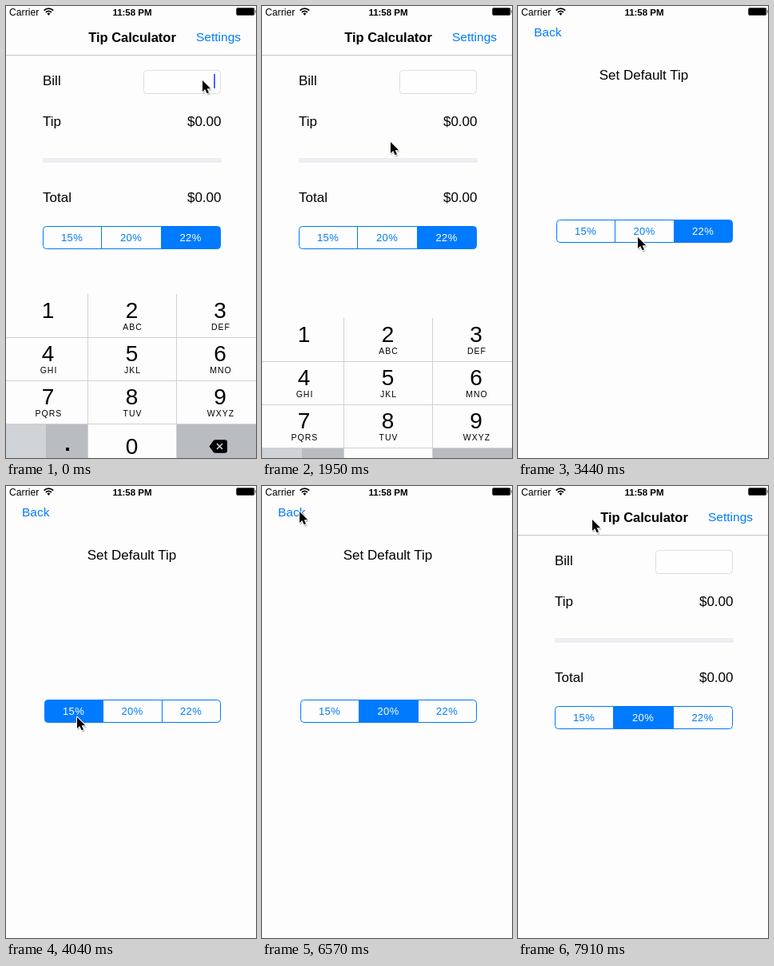
Write an HTML page that moves like this. It is 313x565 px and loops after 8000 ms.

```html
<!DOCTYPE html>
<html lang="en">
<head>
<meta charset="utf-8">
<title>Tip Calculator</title>
<style>
  html, body { margin: 0; width: 100%; height: 100%; overflow: hidden; background: #fdfdfd; }
  svg { display: block; width: 313px; height: 565px; font: 17px "Liberation Sans", Arial, sans-serif; }
  .blue { fill: #007aff; font-size: 15.5px; }
  .mid { text-anchor: middle; }
  .end { text-anchor: end; }
  .title { font-size: 16.5px; font-weight: bold; }
  .percent { font-size: 13px; letter-spacing: .4px; }
  .digit { font-size: 28px; }
  .letters { font-size: 10.5px; letter-spacing: 1px; }
  .paper { fill: #fdfdfd; }
</style>
</head>
<body>
<svg viewBox="0 0 313 565">
  <g>
    <rect class="paper" width="313" height="565"/>
    <text class="title mid" x="158" y="45">Tip Calculator</text>
    <text id="settings" class="blue" x="238" y="44">Settings</text>
    <path d="M0 61.5H313" stroke="#c4c4c6"/>
    <text x="46" y="99">Bill</text>
    <rect x="172.5" y="80.5" width="96" height="29" rx="4" fill="#fefefe" stroke="#dedee0"/>
    <rect id="caret" x="260" y="85" width="2" height="18" fill="#426bf2"/>
    <text x="46" y="150">Tip</text>
    <text class="end" x="269.5" y="150">$0.00</text>
    <rect x="46" y="190" width="224" height="6" fill="#eeedf3"/>
    <text x="46" y="245">Total</text>
    <text class="end" x="269.5" y="245">$0.00</text>
    <g id="mainTips" transform="translate(46.5 275.5)"></g>
  </g>
  <g id="keyboard"></g>
  <g id="sheet">
    <rect class="paper" width="313" height="565"/>
    <text class="blue" x="20" y="38">Back</text>
    <text class="mid" x="157.5" y="92">Set Default Tip</text>
    <g id="sheetTips" transform="translate(48.5 267.5)"></g>
  </g>
  <g>
    <text x="4" y="11.5" font-size="12.2">Carrier</text>
    <g fill="none" stroke="#000" stroke-width="1.7">
      <path d="M47.6 5.6a8.2 8.2 0 0 1 11.6 0M49.8 8a5 5 0 0 1 7.2 0"/>
      <path d="M53.4 11.8l-2-2.2a2.8 2.8 0 0 1 4 0z" fill="#000" stroke="none"/>
    </g>
    <text class="mid" x="158" y="11.5" font-size="11.5" font-weight="bold">11:58 PM</text>
    <rect x="288.5" y="2.5" width="22.5" height="9" rx="1.5" fill="none" stroke="#000" stroke-width=".7"/>
    <rect x="289" y="3" width="21.5" height="8" rx=".8"/>
    <path d="M312 5.3q1.2 1.7 0 3.4z"/>
  </g>
  <g id="pointer">
    <path d="M1 2V16l3.2-3 2.4 5.2 2.4-1-2.4-5h4.6z" opacity=".25" stroke="#000"/>
    <path d="M0 0V14l3.2-3 2.4 5.2 2.4-1-2.4-5h4.6z" stroke="#fff" stroke-width="2" stroke-linejoin="round" paint-order="stroke"/>
  </g>
</svg>
<script>
  const LOOP = 8000, HEIGHT = 565, KEYS_HEIGHT = 216;
  const $ = id => document.getElementById(id);
  const clamp = v => Math.min(1, Math.max(0, v));

  // Three-cell segmented control; returns a function that selects one cell.
  function segmented(group, width) {
    const blue = '#007aff', edges = [0, .33, .667, 1].map(part => Math.round(width * part));
    const cellPaths = [
      `M${edges[1]} 0H4Q0 0 0 4V24Q0 28 4 28H${edges[1]}z`,
      `M${edges[1]} 0H${edges[2]}V28H${edges[1]}z`,
      `M${edges[2]} 0H${width - 4}Q${width} 0 ${width} 4V24Q${width} 28 ${width - 4} 28H${edges[2]}z`
    ];
    group.innerHTML = ['15%', '20%', '22%'].map((label, i) =>
      `<path d="${cellPaths[i]}" stroke="${blue}"/>
       <text class="percent mid" x="${(edges[i] + edges[i + 1]) / 2 - .5}" y="18.5">${label}</text>`).join('');
    const shapes = group.querySelectorAll('path'), labels = group.querySelectorAll('text');
    return selected => shapes.forEach((shape, i) => {
      shape.setAttribute('fill', i === selected ? blue : '#fdfdfd');
      labels[i].setAttribute('fill', i === selected ? '#fff' : blue);
    });
  }

  function buildKeyboard() {
    const letters = ['', 'ABC', 'DEF', 'GHI', 'JKL', 'MNO', 'PQRS', 'TUV', 'WXYZ'];
    const centers = [52.5, 157.5, 268];
    const keys = letters.map((word, i) => {
      const x = centers[i % 3], y = Math.floor(i / 3) * 54;
      return `<text class="digit mid" x="${x}" y="${y + 30}">${i + 1}</text>
              <text class="letters mid" x="${x + 1}" y="${y + 45}">${word}</text>`;
    }).join('');
    $('keyboard').innerHTML = `
      <rect class="paper" width="313" height="216"/>
      <rect y="162" width="50" height="54" fill="#cfd3d7"/>
      <rect x="50" y="162" width="53" height="54" fill="#b9bcc1"/>
      <rect x="213" y="162" width="100" height="54" fill="#b9bcc1"/>
      <path d="M102.5 0V216M213.5 0V216M0 54.5H313M0 108.5H313M0 162.5H313" stroke="#d0d1d3" fill="none"/>
      ${keys}
      <text class="digit mid" x="157.5" y="199.5">0</text>
      <rect x="75" y="192" width="4" height="4"/>
      <path d="M254.5 190.5l5-7q1-1.3 3-1.3h11.5q3 0 3 3v10.6q0 3-3 3h-11.5q-2 0-3-1.3z"/>
      <path d="M264 187l7 7m0-7l-7 7" stroke="#d5d7da" stroke-width="1.5"/>`;
  }

  // The screen refreshes every 150 ms, with a few 140 ms steps.
  const shortSteps = [3000, 4040, 4480, 7770];
  function snap(time) {
    let start = 0;
    for (;;) {
      const next = start + (shortSteps.includes(start) ? 140 : 150);
      if (next > time) return start;
      start = next;
    }
  }

  // Critically damped spring: 0 before the start, settling at 1.
  function spring(t, start) {
    const u = Math.max(0, t - start) * .01826;
    return 1 - (1 + u) * Math.exp(-u);
  }

  // Pointer moves between rests: start, end, and where it arrives.
  const moves = [
    { from: 1200, to: 1800, x: 161, y: 170 },  // blank area
    { from: 2250, to: 2700, x: 263, y: 37 },   // Settings
    { from: 3000, to: 3440, x: 150, y: 289 },
    { from: 3440, to: 3890, x: 89, y: 289 },   // 15%
    { from: 4180, to: 4620, x: 150, y: 295 },  // 20%
    { from: 4620, to: 4920, x: 267, y: 546 },
    { from: 4920, to: 5370, x: 223, y: 90 },
    { from: 5370, to: 5820, x: 30, y: 51 },
    { from: 5970, to: 6120, x: 30, y: 18 },
    { from: 6270, to: 6720, x: 53, y: 37 },    // Back
    { from: 7470, to: 7910, x: 93, y: 42 }
  ];
  function pointerAt(t) {
    let x = 246, y = 93;
    for (const m of moves) {
      const k = clamp((t - m.from) / (m.to - m.from)), eased = k * k * (3 - 2 * k);
      x += (m.x - x) * eased;
      y += (m.y - y) * eased;
    }
    return [x, y];
  }

  const FOCUS = -258, BLUR = 1906.5, OPEN = 2779, CLOSE = 7536, PRESS = 2700;
  const caretAlpha = t => t > BLUR ? 0 : clamp(.5 + 1.2 * Math.cos((t - 50) / 1000 * 2 * Math.PI));
  const settingsAlpha = t => t < PRESS ? 1 : clamp(.2 + (t - PRESS) / 420);

  const selectMain = segmented($('mainTips'), 222);
  const selectSheet = segmented($('sheetTips'), 220);
  buildKeyboard();

  const place = (id, x, y) => $(id).setAttribute('transform', `translate(${x} ${y})`);

  function draw(time) {
    const t = snap(time % LOOP);
    const keysShown = spring(t, FOCUS) - spring(t, BLUR);
    const sheetShown = spring(t, OPEN) - spring(t, CLOSE);
    place('keyboard', 0, Math.round(HEIGHT - KEYS_HEIGHT * keysShown));
    place('sheet', 0, Math.round(HEIGHT * (1 - sheetShown)));
    place('pointer', ...pointerAt(t));
    $('caret').setAttribute('opacity', caretAlpha(t));
    $('settings').setAttribute('opacity', settingsAlpha(t));
    selectMain(t < 4480 ? 2 : 1);
    selectSheet(t < 3890 ? 2 : t < 4480 ? 0 : 1);
  }

  const began = performance.now();
  function tick() {
    draw(performance.now() - began);
    requestAnimationFrame(tick);
  }
  tick();
</script>
</body>
</html>
```
